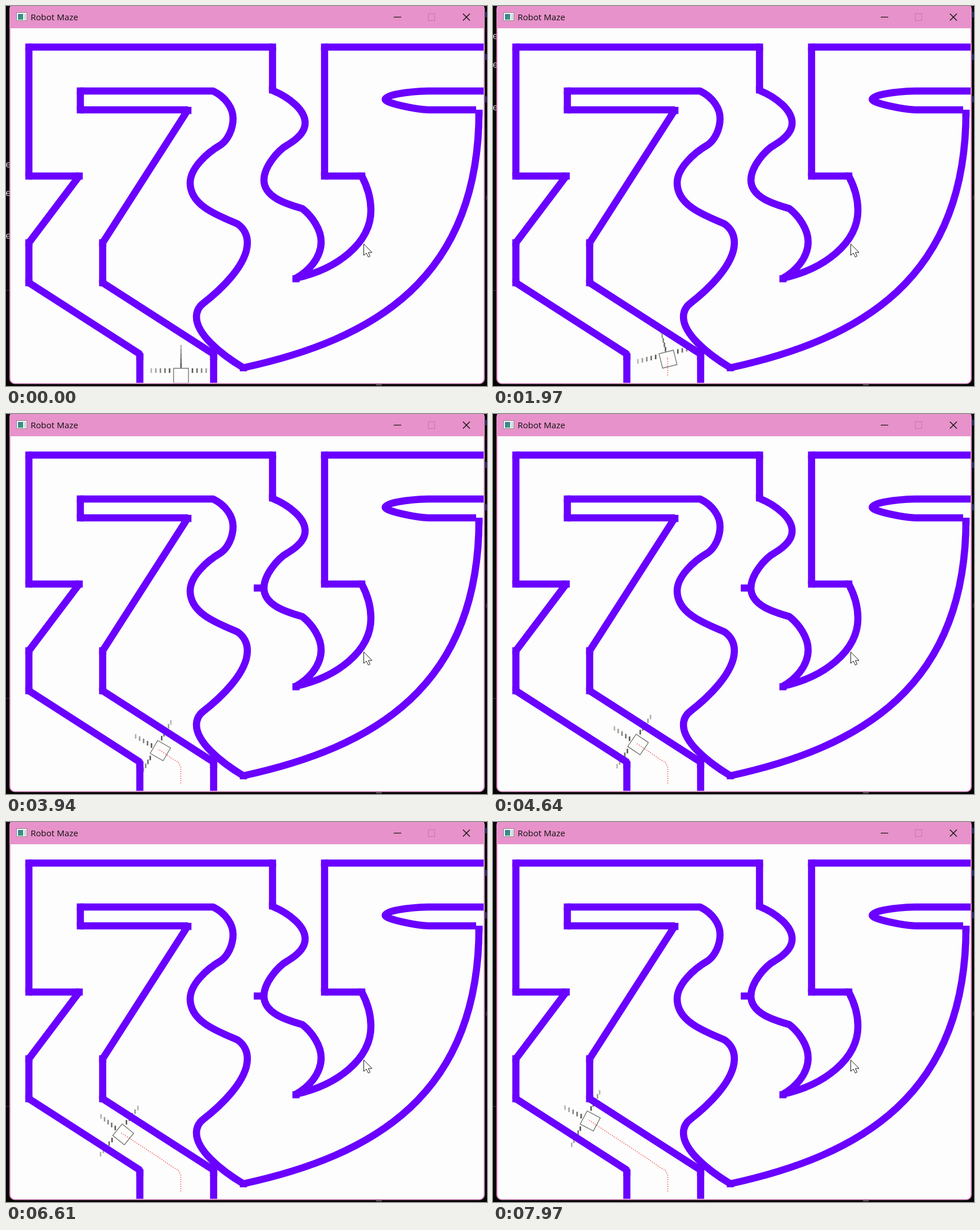
Animation, 841 px wide and 666 px high, one loop 8 s. Source, as an HTML page with a canvas:

```html
<!DOCTYPE html>
<html lang="en">
<head>
<meta charset="utf-8">
<title>Robot Maze</title>
<style>
  html, body { margin: 0; width: 100%; height: 100%; overflow: hidden; background: #050505; }
  canvas { display: block; }
</style>
</head>
<body>
<canvas id="stage" width="841" height="666"></canvas>
<script>
const ctx = document.getElementById('stage').getContext('2d');
const LOOP = 8000;
const WALL = 12.5;
const PURPLE = '#6a00ff';

const outerWall = new Path2D(`M234 670 V610 L40 485 V415 L128 298 H40 V72 H466 V148
  C495 160 523 182 523 205 C523 222 508 234 493 243
  C475 253 451 282 451 305 C451 335 490 347 518 355
  C535 368 551 392 551 413 C551 443 527 466 507 477
  C580 461 638 415 638 358 C638 335 631 315 622 298 H557 V72 H845`);

const innerWall = new Path2D(`M363 670 V610 L169 485 V415 L318 182 H130 V149 H362
  C385 160 397 180 397 197 C397 217 387 235 376 243
  C350 258 322 285 322 310 C322 350 370 367 405 382
  C416 390 422 400 422 415 C422 455 372 500 345 521
  C336 528 333 537 333 545 C333 575 375 610 415 634
  C640 585 828 480 827 182`);

const spike = new Path2D(`M822 182 H738 C715 181 663 170 663 164
  C663 156 700 150 738 149 H845`);

// Square pen marks where wall segments meet.
const corners = [
  [234, 615], [40, 485], [40, 415], [128, 298], [40, 298], [40, 72], [466, 72], [466, 147],
  [507, 478], [622, 298], [557, 298], [557, 72], [363, 615], [169, 485], [169, 415],
  [318, 183], [130, 182], [130, 149], [415, 634], [827, 188]
];

// time, x, y, heading in degrees
const poses = [
  [560, 306, 648, 0],
  [1600, 306, 619, 0],
  [1970, 306, 619, -14],
  [2450, 302, 611, -45],
  [3000, 293, 606, -60],
  [3940, 270, 590, -60],
  [5440, 235, 567, -51],
  [6610, 205, 547.5, -51],
  [7970, 170, 524, -62]
];

function poseAt(t) {
  if (t <= poses[0][0]) return poses[0].slice(1);
  const i = poses.findIndex(p => p[0] > t);
  if (i < 0) return poses[poses.length - 1].slice(1);
  const a = poses[i - 1], b = poses[i];
  const k = (t - a[0]) / (b[0] - a[0]);
  return [1, 2, 3].map(j => a[j] + (b[j] - a[j]) * k);
}

function line(points, color, width) {
  ctx.beginPath();
  points.forEach(([x, y]) => ctx.lineTo(x, y));
  ctx.strokeStyle = color;
  ctx.lineWidth = width;
  ctx.stroke();
}

function box(x, y, w, h, color) {
  ctx.fillStyle = color;
  ctx.fillRect(x, y, w, h);
}

function linesScrolled(t) {
  if (t < 560) return 0;
  if (t < 1970) return Math.min(9, 1 + Math.floor((t - 560) / 133));
  return 9 + Math.floor((t - 1970) / 165);
}

function drawDesktop(t) {
  box(0, 0, 841, 666, '#050505');
  ctx.fillStyle = '#c4c4c4';
  ctx.font = '16px "DejaVu Sans Mono", monospace';
  const shift = linesScrolled(t) * 25;
  [283, 333, 408].forEach(y => ctx.fillText('e', -1, y - shift));
  box(0, 498, 6, 1, '#3c3c3c');
  [[10, 10], [84, 11], [158, 11]].forEach(([y, h]) => box(838, y, 2, h, '#34479a'));
  box(838, 332, 3, 8, '#222222');
  box(647, 663, 10, 2, '#555555');
}

function drawWindow() {
  ctx.beginPath();
  ctx.roundRect(6, -4, 831, 666.5, 9);
  ctx.fillStyle = '#e792ca';
  ctx.fill();
  ctx.beginPath();
  ctx.roundRect(8, 39, 827, 622, [0, 0, 8, 8]);
  ctx.fillStyle = '#fdfdfd';
  ctx.fill();

  box(18, 11, 19, 15, '#8b8b8b');
  box(19, 12, 17, 13, '#f6f6f6');
  const glow = ctx.createLinearGradient(21, 13, 30, 24);
  glow.addColorStop(0, '#3b6fa6');
  glow.addColorStop(1, '#39a477');
  box(21, 14, 9, 10, glow);
  box(32, 14, 3, 10, '#d2d2d2');

  ctx.fillStyle = '#101010';
  ctx.font = '15px "Open Sans", "Noto Sans", sans-serif';
  ctx.fillText('Robot Maze', 43, 25);

  line([[678, 19.5], [691, 19.5]], '#111111', 1.2);
  ctx.strokeStyle = '#c477a8';
  ctx.lineWidth = 1;
  ctx.strokeRect(738.5, 13.5, 11, 12);
  line([[799, 13.5], [811, 25.5]], '#111111', 1.4);
  line([[811, 13.5], [799, 25.5]], '#111111', 1.4);
}

function drawRobot(t) {
  const [x, y, deg] = poseAt(t);
  const a = deg * Math.PI / 180;
  const sin = Math.sin(a), cos = Math.cos(a);
  const place = (side, ahead) => [x + side * cos + ahead * sin, y + side * sin - ahead * cos];

  const sensors = [d => [-d, 9], d => [d, 9], d => [0, d - 2]];
  for (let i = 4; i >= 0; i--) {
    const shade = 88 + i * 23;
    const color = `rgb(${shade}, ${shade}, ${shade - 6})`;
    sensors.forEach(at => {
      const [px, py] = place(...at(20 + i * 8));
      box(px - 1.3, py - 4, 2.6, 8, color);
    });
  }

  const half = 13;
  ctx.beginPath();
  [[-half, -half], [half, -half], [half, half], [-half, half]]
    .forEach(p => ctx.lineTo(...place(...p)));
  ctx.closePath();
  ctx.fillStyle = '#fdfdfd';
  ctx.fill();
  ctx.strokeStyle = '#777772';
  ctx.lineWidth = 1.4;
  ctx.stroke();

  if (t <= 560) return;
  const lead = 5 * Math.max(0, Math.min(1, (t - 1970) / 500));
  const trail = poses.filter(p => p[0] < t).map(p => [p[1] - 0.5, p[2] - 0.5]);
  trail.push([x - 0.5, y - 0.5], place(0, lead));
  ctx.setLineDash([1.6, 2.4]);
  line(trail, '#ee3b3b', 1.3);
  ctx.setLineDash([]);
}

function drawMaze(t) {
  ctx.strokeStyle = PURPLE;
  ctx.lineWidth = WALL;
  ctx.lineJoin = 'bevel';
  [outerWall, innerWall, spike].forEach(p => ctx.stroke(p));
  const marks = t >= 3660 ? [...corners, [439.5, 305]] : corners;
  marks.forEach(([x, y]) => box(x - WALL / 2, y - WALL / 2, WALL, WALL, PURPLE));
  ctx.lineJoin = 'miter';
}

function drawCursor() {
  ctx.save();
  ctx.translate(625.5, 417);
  ctx.beginPath();
  [[0, 0], [0, 20], [4.5, 16], [8, 23], [11, 21.5], [8, 15], [14.5, 15]]
    .forEach(p => ctx.lineTo(...p));
  ctx.closePath();
  ctx.fillStyle = '#ffffff';
  ctx.fill();
  ctx.strokeStyle = '#1a1a1a';
  ctx.lineWidth = 1;
  ctx.stroke();
  ctx.restore();
}

function draw(t) {
  drawDesktop(t);
  drawWindow();
  ctx.save();
  ctx.beginPath();
  ctx.rect(8, 39, 827, 621.5);
  ctx.clip();
  drawRobot(t);
  drawMaze(t);
  ctx.restore();
  drawCursor();
}

const start = performance.now();
function tick() {
  draw((performance.now() - start) % LOOP);
  requestAnimationFrame(tick);
}
tick();
</script>
</body>
</html>
```
